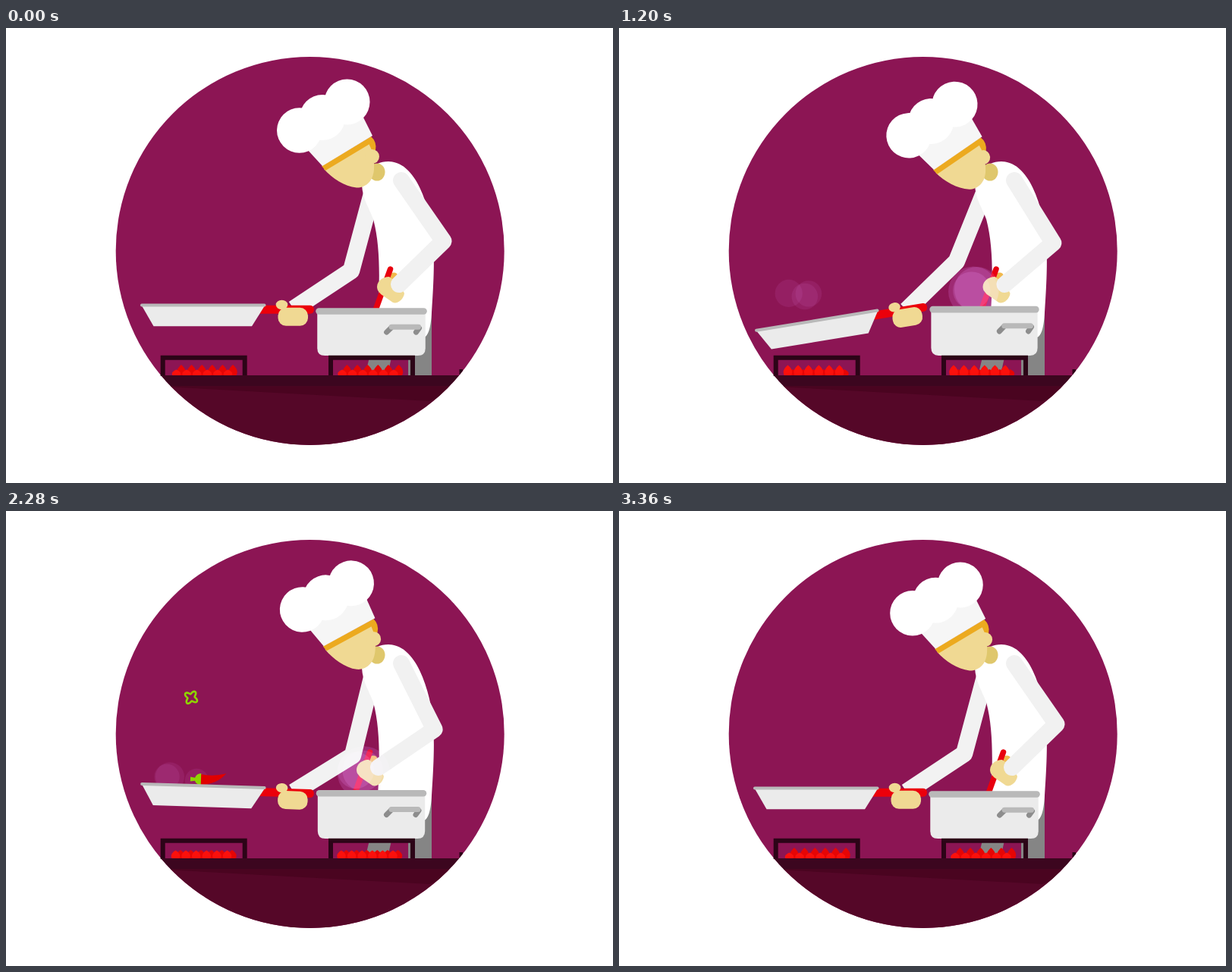
An HTML page for the animation above (3.4 s loop, 800x600 px).

```html
<!DOCTYPE html>
<html lang="en">
<head>
<meta charset="utf-8">
<title>Chef at the stove</title>
<style>
  html, body { margin: 0; width: 100%; height: 100%; overflow: hidden; background: #fff; }
  svg { display: block; width: 100vw; height: 100vh; }
  .puff { fill: #9154aa; mix-blend-mode: screen; }
  .line { fill: none; stroke-linejoin: round; }
</style>
</head>
<body>
<svg viewBox="0 0 800 600">
  <defs>
    <clipPath id="disc"><circle cx="400.7" cy="294" r="256"/></clipPath>
    <path id="burner" d="M206.7 459V434.7H314.7V459" fill="none" stroke="#2c0417" stroke-width="6"/>
  </defs>
  <circle cx="400.7" cy="294" r="256" fill="#8c1554"/>

  <path d="M530 368H561V459H530Z M480 430H509L505 448 500 459H473Z" fill="#858585"/>
  <polyline id="panArm" class="line" stroke="#f2f2f2" stroke-width="22.500"/>
  <path id="torso" fill="#fff"/>
  <ellipse id="neck" rx="10.5" ry="11.5" fill="#dfc76c"/>

  <g id="head">
    <path d="M481 143Q489 150 487 161L480 162 477 150Z" fill="#ecaa1f"/>
    <path d="M419 186L478 152 482 161Q486 175 485 186C484 204 472 211 462 210.500C446 209 430 198 419 186Z" fill="#f0d993"/>
    <circle cx="482.500" cy="169.500" r="9.500" fill="#f0d993"/>
    <path d="M416 182L481 143 482.500 151 421 188Z" fill="#ecaa1f"/>
    <path d="M396 159L417 182 483 142 470 116 440 110Z" fill="#f6f6f6"/>
    <g fill="#fff">
      <circle cx="386.700" cy="135" r="29.700"/>
      <circle cx="417" cy="118" r="30"/>
      <circle cx="449.500" cy="97.500" r="30"/>
    </g>
  </g>

  <g id="stir">
    <ellipse cx="511" cy="327" rx="5.500" ry="4.500" fill="#f0b84d"/>
    <path d="M506.500 318L487 372" stroke="#e8000f" stroke-width="7.500" stroke-linecap="round"/>
    <path d="M490 346C486 336 495 328 505 328L520 339 525 350C524 358 516 364 510 362L494 351Z" fill="#f0d993"/>
  </g>
  <polyline id="stirArm" class="line" stroke="#f1f1f1" stroke-width="22" stroke-linecap="round"/>
  <g id="potSmoke" style="display:contents"></g>

  <g id="pot">
    <path d="M410.800 371H552.200V422Q552.200 432 542.200 432H420.800Q410.800 432 410.800 422Z" fill="#ebebeb"/>
    <path d="M413 372.300H550" stroke="#b9b9b9" stroke-width="8.500" stroke-linecap="round"/>
    <path d="M501.500 400.500L507 395M540 400.500L544 395" stroke="#8d8d8d" stroke-width="7" stroke-linecap="round"/>
    <path d="M508 393.500H543" stroke="#b9b9b9" stroke-width="7" stroke-linecap="round"/>
  </g>

  <g id="panSmoke" style="display:contents"></g>
  <g id="food"></g>
  <g id="pan">
    <path d="M341 365.500H401Q406 366 406 371Q406 376 401 376.500H334Z" fill="#eb000b"/>
    <path d="M179 366H341L324 393H194.500Z" fill="#ebebeb"/>
    <path d="M179 365.300H340.500" stroke="#b9b9b9" stroke-width="4" stroke-linecap="round"/>
  </g>
  <g id="panHand" fill="#f0d993">
    <rect x="358.500" y="368.500" width="39.500" height="24" rx="10.500"/>
    <ellipse cx="363.500" cy="364.700" rx="7.800" ry="6.200"/>
  </g>

  <path id="flamesBack" fill="#e60505"/>
  <path id="flamesFront" fill="#fb100c"/>
  <use href="#burner"/>
  <use href="#burner" x="221.300"/>
  <g clip-path="url(#disc)">
    <path d="M597.500 450H602V459H597.500Z" fill="#2c0417"/>
    <path d="M140 458H660V473H140Z" fill="#3c061f"/>
    <path d="M140 472.500H660V560H140Z" fill="#550728"/>
    <path d="M200 472.500H610L558 492Z" fill="#4a0420"/>
  </g>
</svg>

<script>
const LOOP = 3400, STEP = 40, TAU = Math.PI * 2;
const $ = id => document.getElementById(id);
const set = (node, attrs) => { for (const k in attrs) node.setAttribute(k, attrs[k]); };
const make = (tag, attrs, parent) => {
  const node = document.createElementNS('http://www.w3.org/2000/svg', tag);
  set(node, attrs);
  return parent.appendChild(node);
};

const progress = (t, a, b) => Math.min(1, Math.max(0, (t - a) / (b - a)));
const ease = u => (1 - Math.cos(Math.PI * u)) / 2;
// Smooth rise and fall between a and b
const bump = (t, a, b) => Math.sin(Math.PI * progress(t, a, b)) ** 2;
// Rises from a to b, holds, falls from c to d
const plateau = (t, a, b, c, d) => ease(progress(t, a, b)) - ease(progress(t, c, d));

let seed = 7;
const random = (min, max) => {
  seed = seed * 16807 % 2147483647;
  return min + (max - min) * seed / 2147483647;
};

// Stirring hand offset over one stroke: pull back, push forward, pause, finish
const STIR_PERIOD = 1680;
const stirKeys = [[0, 0], [600, -27], [1200, -9.5], [1320, -9], [STIR_PERIOD, 0]];
function stirOffset(t) {
  const i = stirKeys.findIndex(([time]) => time > t);
  const [t0, from] = stirKeys[i - 1], [t1, to] = stirKeys[i];
  return from + (to - from) * progress(t, t0, t1);
}

// Straightening the back moves the upper torso most
const torsoOutline = 'M469 207C469 195 482 176 504 176C525 176 540 196 549 219C566 262 566 300 561 375C560 396 556 408 550 408L490 375C493 330 493 285 484 252C479 238 470 226 469 207Z';
const bend = lean => torsoOutline.replace(/(\d+) (\d+)/g, (_, x, y) => {
  const k = lean * Math.max(0, (400 - y) / 200) ** 2.5;
  return `${+x + 17 * k} ${y - 2.5 * k}`;
});

const PUFF_LIFE = 300;
const bursts = [320, 600, 1160, 2280, 2640, 3000];
const puffs = [];
function addPuffs(parent, count, strength, xs, ys, radii) {
  for (const peak of bursts)
    for (let i = 0; i < count; i++)
      puffs.push({
        peak, strength, y: random(...ys), r: random(...radii),
        node: make('circle', { class: 'puff', cx: random(...xs) }, parent)
      });
}
addPuffs($('potSmoke'), 3, .27, [456, 473], [338, 350], [22, 36]);
addPuffs($('panSmoke'), 3, .13, [203, 262], [350, 356], [15, 19]);

const GREEN = '#8fd400', RED = '#e00000';
function cloverPath() {
  const points = Array.from({ length: 49 }, (_, i) => {
    const a = i / 48 * TAU, r = 7 - 2.3 * Math.cos(4 * a);
    return `${(r * Math.cos(a)).toFixed(2)} ${(r * Math.sin(a)).toFixed(2)}`;
  });
  return `M${points.join('L')}Z`;
}
const shapes = {
  pepper: g => make('path', { d: cloverPath(), fill: 'none', stroke: GREEN, 'stroke-width': 2.6 }, g),
  chili: g => {
    make('path', { d: 'M-8 -29Q7 -17 8 5H-6Q-3 -12 -8 -29Z', fill: RED }, g);
    make('path', { d: 'M-7 4H8.500Q8 10 3 12L4 18H-2L-1 12Q-7 10 -7 4Z', fill: GREEN }, g);
  },
  pea: g => make('circle', { r: 5.6, fill: GREEN }, g),
  hoop: g => make('circle', { r: 4, fill: 'none', stroke: GREEN, 'stroke-width': 3 }, g),
  mushroom: g => make('path', { d: 'M-6 -3Q-5 -8 0 -8Q6 -8 6 -2L2 -2V6H-2V-2Z', fill: '#f5eee0' }, g),
  slice: g => make('ellipse', { rx: 11, ry: 6, fill: RED }, g)
};
// Everything leaves the pan together; height sets the flight time.
// x and turn are given at MID_TOSS
const TOSS = 1450, MID_TOSS = 1880, PAN_Y = 380;
const food = [
  { shape: 'pepper', x: 216, height: 205, turn: -12 },
  { shape: 'chili', x: 233, height: 143, turn: 0 },
  { shape: 'pea', x: 200, height: 83, turn: 0 },
  { shape: 'mushroom', x: 228, height: 77, turn: -40 },
  { shape: 'hoop', x: 204, height: 67, turn: 0 },
  { shape: 'pea', x: 237, height: 67, turn: 0 },
  { shape: 'slice', x: 229, height: 48, turn: -30 }
].map(item => {
  const node = make('g', {}, $('food'));
  shapes[item.shape](node);
  return { ...item, node };
});

function flames(x, height) {
  const mid = 458 - height * .45;
  let d = '';
  for (const left of [x, x + 218.5])
    for (let i = 0; i < 6; i++) {
      const c = left + 13.6 * i;
      d += `M${c - 4} 459Q${c - 9} ${mid} ${c} ${458 - height}Q${c + 9} ${mid} ${c + 4} 459Z`;
    }
  return d;
}

function drawBody(t, lean, stir) {
  set($('torso'), { d: bend(lean) });
  set($('neck'), { cx: 489 + 23 * lean, cy: 190 - 4 * lean });
  const nod = 5.7 * (bump(t, 0, 780) + bump(t, 2560, LOOP)) - 3.4 * bump(t, 850, 1600)
    + 21.6 * plateau(t, 1320, 1650, 1900, 2390);
  set($('head'), { transform: `translate(${14 * lean} ${-3 * lean}) rotate(${nod} 500 218)` });

  set($('stir'), { transform: `translate(${stir} 0)` });
  const elbowX = 576.5 + stir * .44 + 1.5 * lean, elbowY = 281 - stir * .26 - 3 * lean;
  set($('stirArm'), { points: `${521 + 19 * lean},201 ${elbowX},${elbowY} ${518 + stir},338` });
}

function drawPan(t, lean) {
  const shaking = t < 960 || t >= 2400;
  const sway = TAU * (shaking ? t / 480 : progress(t, 1900, 2260));
  const tilt = 9 * bump(t, 1360, 1640) - 9.3 * bump(t, 960, 1440)
    + 1.8 * bump(t, 2160, 2400) - bump(t, 2800, 3200);
  const dx = -4.5 * (1 - Math.cos(sway)), dy = .3 - 3 * Math.sin(sway) + .2 * Math.abs(tilt);
  const transform = `translate(${dx} ${dy}) rotate(${tilt} 372 368)`;
  set($('pan'), { transform });
  set($('panHand'), { transform });

  const shoulder = [485 + 17 * lean, 208 + 2 * lean];
  const elbow = [455 + dx + 1.1 * tilt - 15 * lean, 320 + 1.2 * dx + 1.3 * tilt - 18 * lean];
  set($('panArm'), { points: [shoulder, elbow, [379 + dx, 370 + dy]].join(' ') });
}

function drawSmoke(t) {
  for (const { peak, y, r, strength, node } of puffs) {
    const u = (t - peak) / PUFF_LIFE;
    set(node, {
      cy: y - 12 * u,
      r: Math.max(0, r * (1 + .3 * u)),
      opacity: Math.max(0, strength * (1 - u * u))
    });
  }
}

function drawFood(t) {
  for (const { x, height, turn, node } of food) {
    const u = (t - TOSS) / (73 * Math.sqrt(height)), since = t - MID_TOSS;
    set(node, {
      visibility: u >= 0 && u <= 1 ? 'visible' : 'hidden',
      transform: `translate(${x + .07 * since} ${PAN_Y - height * 4 * u * (1 - u)}) rotate(${turn + .23 * since})`
    });
  }
}

function drawStove(t) {
  const flicker = Math.cos(t / 160 * TAU);
  set($('flamesBack'), { d: flames(230 + flicker, 11 + 3 * flicker) });
  set($('flamesFront'), { d: flames(223.5 + flicker, 10.5 - 3 * flicker) });
  set($('pot'), {
    transform: `translate(481.5 432) scale(${1 + .008 * flicker} ${1 - .02 * flicker}) translate(-481.5 -432)`
  });
}

function draw(t) {
  const lean = plateau(t, 1320, 1680, 1900, 2240);
  drawBody(t, lean, stirOffset(t % STIR_PERIOD));
  drawPan(t, lean);
  drawSmoke(t);
  drawFood(t);
  drawStove(t);
}

const begin = performance.now();
function tick() {
  const t = (performance.now() - begin) % LOOP;
  draw(Math.floor(t / STEP) * STEP);
  requestAnimationFrame(tick);
}
tick();
</script>
</body>
</html>
```
